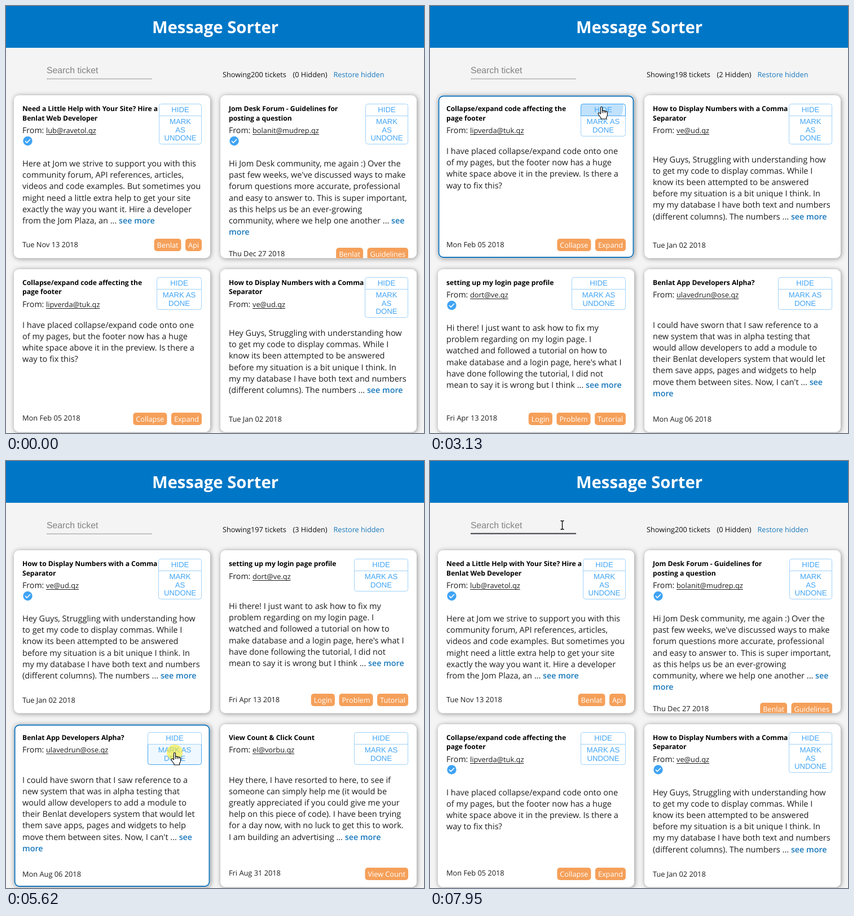
These frames come from a looping animation (741x756 px, 8000 ms). An HTML page with a canvas:

```html
<!DOCTYPE html>
<html lang="en">
<head>
<meta charset="utf-8">
<title>Message Sorter</title>
<style>
html, body { margin: 0; width: 100%; height: 100%; overflow: hidden; background: #f4f4f4; }
canvas { display: block; width: 741px; height: 756px; }
</style>
</head>
<body>
<canvas id="stage"></canvas>
<script>
const W = 741, H = 756, LOOP = 8000, STEP = 78, START = 220;
const COL = 366, ROW = 307.5;
const BLUE = '#42a5f5', LINK = '#1878bb', INK = '#1c1c1c';
const UI = '"Open Sans", "Noto Sans", sans-serif';
const SANS = '"Liberation Sans", Arial, sans-serif';
const RESTORE = 7420;

const canvas = document.getElementById('stage');
const ctx = canvas.getContext('2d');
const dpr = window.devicePixelRatio || 1;
canvas.width = W * dpr;
canvas.height = H * dpr;
ctx.scale(dpr, dpr);
ctx.textRendering = 'geometricPrecision';

const cards = [
  {
    title: ['Need a Little Help with Your Site? Hire a', 'Benlat Web Developer'],
    mail: 'lub@ravetol.qz', date: 'Tue Nov 13 2018', tags: ['Benlat', 'Api'],
    left: 271, narrow: true, done: () => true,
    body: ['Here at Jom we strive to support you with this',
      'community forum, API references, articles,',
      'videos and code examples. But sometimes you',
      'might need a little extra help to get your site',
      'exactly the way you want it. Hire a developer',
      'from the Jom Plaza, an ... |see more']
  },
  {
    title: ['Jom Desk Forum - Guidelines for', 'posting a question'],
    mail: 'bolanit@mudrep.qz', date: 'Thu Dec 27 2018', tags: ['Benlat', 'Guidelines'],
    left: 271, narrow: true, done: () => true,
    body: ['Hi Jom Desk community, me again :) Over the',
      "past few weeks, we've discussed ways to make",
      'forum questions more accurate, professional',
      'and easy to answer to. This is super important,',
      'as this helps us be an ever-growing',
      'community, where we help one another ... |see', '|more']
  },
  {
    title: ['Collapse/expand code affecting the', 'page footer'],
    mail: 'lipverda@tuk.qz', date: 'Mon Feb 05 2018', tags: ['Collapse', 'Expand'],
    left: 267, done: t => t >= RESTORE,
    body: ['I have placed collapse/expand code onto one',
      'of my pages, but the footer now has a huge',
      'white space above it in the preview. Is there a',
      'way to fix this?']
  },
  {
    title: ['How to Display Numbers with a Comma', 'Separator'],
    mail: 've@ud.qz', date: 'Tue Jan 02 2018', tags: [],
    left: 270, narrow: true, done: t => t >= 3900,
    body: ['Hey Guys, Struggling with understanding how',
      'to get my code to display commas. While I',
      'know its been attempted to be answered',
      'before my situation is a bit unique I think. In',
      'my my database I have both text and numbers',
      '(different columns). The numbers ... |see more']
  },
  {
    title: ['setting up my login page profile'],
    mail: 'dort@ve.qz', date: 'Fri Apr 13 2018', tags: ['Login', 'Problem', 'Tutorial'],
    left: 251, done: t => t < 4720,
    body: ['Hi there! I just want to ask how to fix my',
      'problem regarding on my login page. I',
      'watched and followed a tutorial on how to',
      "make database and a login page, here's what I",
      'have done following the tutorial, I did not',
      'mean to say it is wrong but I think ... |see more']
  },
  {
    title: ['Benlat App Developers Alpha?'],
    mail: 'ulavedrun@ose.qz', date: 'Mon Aug 06 2018', tags: [],
    left: 251, done: t => t >= 5760,
    body: ['I could have sworn that I saw reference to a',
      'new system that was in alpha testing that',
      'would allow developers to add a module to',
      'their Benlat developers system that would let',
      'them save apps, pages and widgets to help',
      "move them between sites. Now, I can't ... |see", '|more']
  },
  {
    title: ['View Count & Click Count'],
    mail: 'el@vorbu.qz', date: 'Fri Aug 31 2018', tags: ['View Count'],
    left: 251, done: () => false,
    body: ['Hey there, I have resorted to here, to see if',
      'someone can simply help me (it would be',
      'greatly appreciated if you could give me your',
      'help on this piece of code). I have been trying',
      'for a day now, with no luck to get this to work.',
      'I am building an advertising ... |see more']
  }
];

// Pointer path: time, x, y
const path = [
  [220, 520, 735], [500, 465, 420], [690, 385, 140], [990, 304, 178],
  [3450, 304, 178], [3740, 311, 214], [3960, 311, 214], [4290, 480, 230],
  [4560, 633, 205], [4860, 633, 205], [5150, 550, 415], [5560, 299, 516],
  [6030, 299, 516], [6300, 637, 86], [6380, 637, 86], [6910, 613, 124],
  [7500, 613, 124], [7740, 420, 140], [7940, 234, 113]
];

// Mouse down, mouse up
const clicks = [[1160, 1700], [2054, 2490], [2800, 3200], [3760, 3900],
  [4580, 4720], [5640, 5760], [7110, 7260]];
const hides = clicks.slice(0, 3).map(c => c[1]);

const clamp = v => Math.max(0, Math.min(1, v));
const inside = (p, r) => p && p.x >= r.x && p.x <= r.x + r.w && p.y >= r.y && p.y <= r.y + r.h;

function pointerAt(t) {
  if (t < START) return null;
  const i = path.findIndex(k => k[0] > t);
  if (i < 0) {
    const [, x, y] = path[path.length - 1];
    return { x, y };
  }
  const [t0, x0, y0] = path[i - 1], [t1, x1, y1] = path[i];
  const s = (t - t0) / (t1 - t0), e = s * s * (3 - 2 * s);
  return { x: x0 + (x1 - x0) * e, y: y0 + (y1 - y0) * e };
}

function text(str, x, y, font, color, align = 'left') {
  ctx.font = font;
  ctx.fillStyle = color;
  ctx.textAlign = align;
  ctx.fillText(str, x, Math.round(y));
  return ctx.measureText(str).width;
}

function box(r, radius) {
  ctx.beginPath();
  ctx.roundRect(r.x, r.y, r.w, r.h, radius);
}

function disc(x, y, r, color) {
  ctx.fillStyle = color;
  ctx.beginPath();
  ctx.arc(x, y, r, 0, Math.PI * 2);
  ctx.fill();
}

function drawRipples(r, t) {
  for (const [down, up] of clicks) {
    const p = pointerAt(down), age = t - down;
    if (age < 0 || !inside(p, r)) continue;
    const fade = t < up ? 1 : clamp(1 - (t - up) / 350);
    const s = clamp(age / 550);
    disc(p.x, p.y, 48 * (1 - (1 - s) ** 2), `rgba(66,165,245,${0.27 * fade})`);
  }
}

function drawButton(r, corners, lines, t, mouse) {
  const over = inside(mouse, r);
  ctx.save();
  box(r, corners);
  ctx.clip();
  if (over) {
    ctx.fillStyle = 'rgba(66,165,245,.08)';
    ctx.fillRect(r.x, r.y, r.w, r.h);
  }
  drawRipples(r, t);
  ctx.restore();
  lines.forEach((s, i) =>
    text(s, r.x + r.w / 2, r.y + 15 + i * 14.5, '13.2px ' + SANS, BLUE, 'center'));
  ctx.strokeStyle = over ? BLUE : '#a0d2fa';
  ctx.lineWidth = 1;
  box({ x: r.x + .5, y: r.y + .5, w: r.w - 1, h: r.h - 1 }, corners);
  ctx.stroke();
  return over;
}

function drawTick(x, y) {
  disc(x, y, 8.2, '#3fa3f4');
  ctx.strokeStyle = '#fff';
  ctx.lineWidth = 1.7;
  ctx.beginPath();
  ctx.moveTo(x - 4.5, y);
  ctx.lineTo(x - 1.5, y + 3);
  ctx.lineTo(x + 4.5, y - 3);
  ctx.stroke();
}

function drawTags(tags, right, top) {
  for (const tag of [...tags].reverse()) {
    ctx.font = '12.7px ' + UI;
    const w = ctx.measureText(tag).width + 10;
    ctx.fillStyle = '#f5a05a';
    box({ x: right - w, y: top, w, h: 22 }, 5);
    ctx.fill();
    text(tag, right - w + 5, top + 16, ctx.font, '#fff');
    right -= w + 7.5;
  }
}

function drawBody(lines, x, y) {
  lines.forEach((line, i) => {
    const [plain, more] = line.split('|');
    const by = y + i * 20.2;
    const w = text(plain, x, by, '14.5px ' + UI, INK);
    if (more) text(more, x + w, by, '600 14.3px ' + UI, LINK);
  });
}

// Returns true when the pointer is over one of the card's buttons.
function drawCard(card, slot, t, mouse) {
  const dx = slot % 2 * COL, dy = slot > 1 ? ROW : 0;
  const x = 29 + dx, done = card.done(t);
  const frame = { x: 14 + dx, y: Math.round(158 + dy), w: 348, h: 288.5 };

  ctx.save();
  ctx.shadowColor = 'rgba(0,0,0,.42)';
  ctx.shadowBlur = 8;
  ctx.shadowOffsetX = ctx.shadowOffsetY = 1;
  ctx.fillStyle = '#fff';
  box(frame, 9);
  ctx.fill();
  ctx.restore();

  ctx.save();
  box(frame, 9);
  ctx.clip();

  card.title.forEach((s, i) => text(s, x, 186 + dy + i * 16.5, 'bold 12.1px ' + UI, '#000'));
  const fromY = 208.5 + (card.title.length - 1) * 16.5 + dy;
  text('From:', x, fromY, '14.2px ' + UI, INK);
  const mailW = text(card.mail, x + 42, fromY, '12.8px ' + UI, INK);
  ctx.fillRect(x + 42, Math.round(fromY) + 2, mailW, 1);
  const tickY = fromY + 14;
  if (done) drawTick(x + 9.5, tickY);

  const top = Math.floor(173 + dy), left = card.left + dx, w = 347 - card.left;
  const state = done ? 'UNDONE' : 'DONE';
  const label = card.narrow ? ['MARK', 'AS', state] : ['MARK AS', state];
  const mark = { x: left, y: top + 21, w, h: card.narrow ? 51 : 37 };
  const hide = { x: left, y: top, w, h: 22 };
  const overMark = drawButton(mark, [0, 0, 4, 4], label, t, mouse);
  const overHide = drawButton(hide, [4, 4, 0, 0], ['HIDE'], t, overMark ? null : mouse);

  const bodyY = Math.max((card.narrow ? 276.5 : 262) + dy, done ? tickY + 45 : 0);
  drawBody(card.body, x, bodyY);

  const last = bodyY + (card.body.length - 1) * 20.2;
  const hasTags = card.tags.length > 0;
  const dateY = Math.max((hasTags ? 426.5 : 428) + dy, hasTags ? last + 37.5 : 0);
  text(card.date, x, dateY, '12.8px ' + UI, INK);
  drawTags(card.tags, 347 + dx, Math.round(dateY - 14.5));
  ctx.restore();

  if (inside(mouse, frame)) {
    ctx.strokeStyle = '#1272b6';
    ctx.lineWidth = 2;
    box({ x: frame.x + 1.5, y: frame.y + 1.5, w: frame.w - 3, h: frame.h - 3 }, 8);
    ctx.stroke();
  }
  return overMark || overHide;
}

const hand = new Path2D('M-2 1.5Q-2 0-.5 0Q1 0 1 1.5V7Q2.6 6 4 7.3Q6 6.6 7 8.2Q9.6 7.6 10 9.6' +
  'V14Q10 17 8 19V21.5H-1.5V19.5Q-4 16.5-6 13.5Q-7 11-5 10.5Q-3.5 10.5-2 12.5Z');
const fingers = new Path2D('M1 7V11M4 7.5V11M7 8.5V11');
const arrow = new Path2D('M0 0V16L3.7 12.5L6.3 18.4L8.6 17.4L6 11.6H11.3Z');
const beam = new Path2D('M-3-7.5H-1L0-6.5L1-7.5H3M0-6.5V6.5M-3 7.5H-1L0 6.5L1 7.5H3');

function drawPointer(p, kind, t) {
  const pressed = clicks.find(([down]) => t >= down - STEP / 2 && t < down + 150);
  if (pressed) disc(p.x, p.y, 14, 'rgba(245,236,50,.62)');
  ctx.save();
  ctx.translate(Math.round(p.x) + .5, Math.round(p.y) + .5);
  ctx.strokeStyle = '#000';
  ctx.lineWidth = kind === 'beam' ? 1.3 : 1.1;
  ctx.lineJoin = 'round';
  const shape = { hand, arrow, beam }[kind];
  if (kind !== 'beam') {
    ctx.fillStyle = '#fff';
    ctx.fill(shape);
  }
  ctx.stroke(shape);
  if (kind === 'hand') ctx.stroke(fingers);
  ctx.restore();
}

function drawTop(hidden, overSearch) {
  ctx.fillStyle = '#0077c6';
  ctx.fillRect(0, 0, W, 74);
  text('Message Sorter', 371, 48, 'bold 29.3px ' + UI, '#fff', 'center');

  text('Search ticket', 72, 119, '15.8px ' + SANS, '#828282');
  ctx.fillStyle = overSearch ? '#3b3b42' : '#949494';
  ctx.fillRect(72, overSearch ? 127.5 : 128.5, 187, overSearch ? 2 : 1);

  const font = '12.7px ' + UI;
  text(`Showing${200 - hidden} tickets`, 384, 126, font, '#111');
  text(`(${hidden} Hidden)`, 508.5, 126, font, '#111');
  text('Restore hidden', 580.5, 126, font, LINK);
}

function draw(time) {
  const t = time < START ? 0 : START + STEP * Math.floor((time - START) / STEP);
  const mouse = pointerAt(t);
  const hidden = time >= RESTORE ? 0 : hides.filter(h => t >= h).length;
  const overSearch = inside(mouse, { x: 72, y: 100, w: 187, h: 30 });
  let overLink = inside(mouse, { x: 580, y: 114, w: 90, h: 17 });

  ctx.fillStyle = '#f4f4f4';
  ctx.fillRect(0, 0, W, H);
  drawTop(hidden, overSearch);
  cards.slice(hidden, hidden + 4).forEach((card, slot) => {
    if (drawCard(card, slot, time >= RESTORE ? time : t, mouse)) overLink = true;
  });
  if (mouse) drawPointer(mouse, overSearch ? 'beam' : overLink ? 'hand' : 'arrow', t);
}

const begin = performance.now();
function tick() {
  draw((performance.now() - begin) % LOOP);
  requestAnimationFrame(tick);
}
tick();
</script>
</body>
</html>
```
